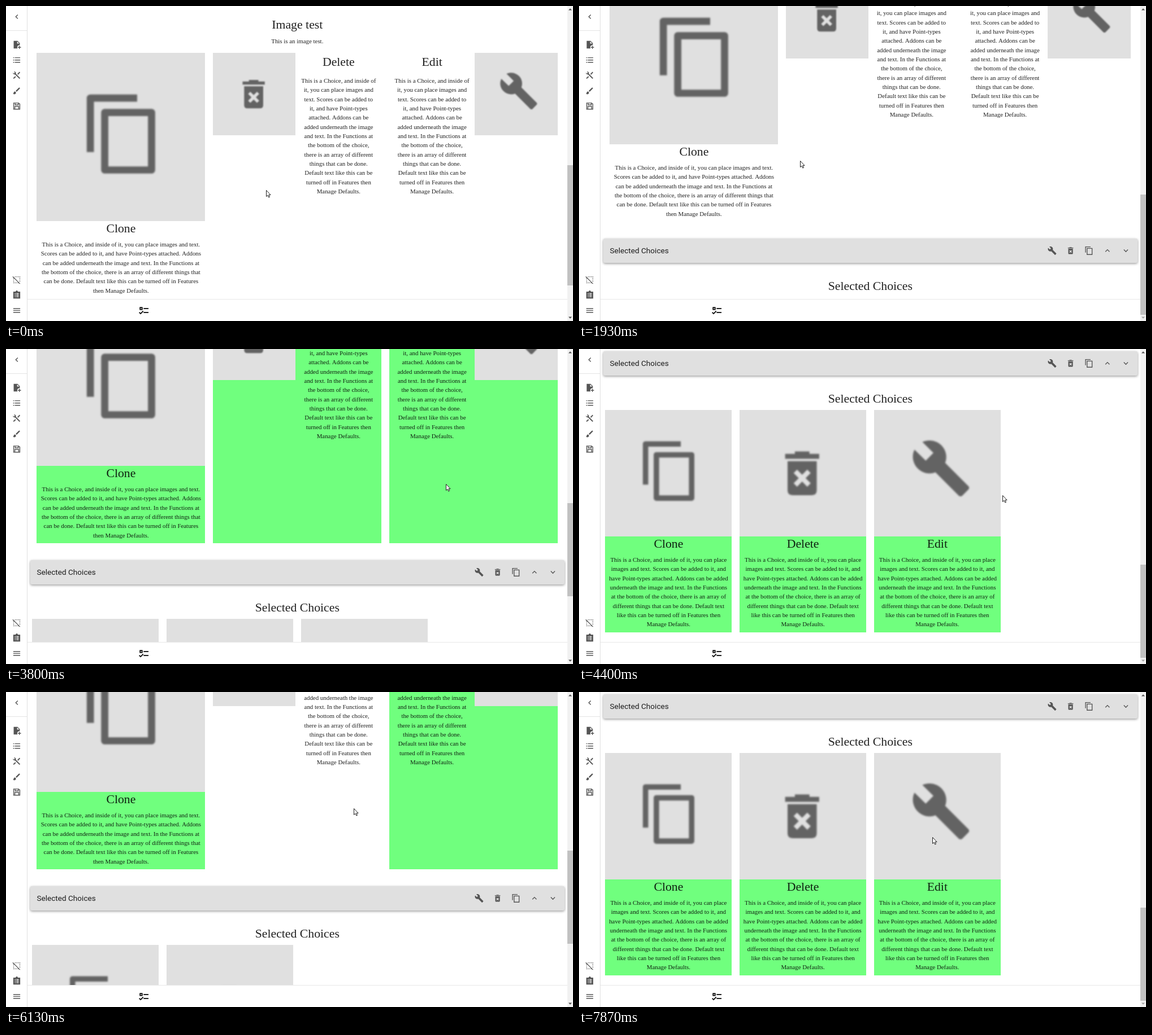
Write an HTML page with a canvas that moves like this. It is 1003x558 px and loops after 8670 ms.

```html
<!DOCTYPE html>
<html lang="en">
<head>
<meta charset="utf-8">
<title>Selected choices</title>
<style>
  html, body { margin: 0; width: 100%; height: 100%; overflow: hidden; background: #fff; }
  canvas { display: block; }
</style>
</head>
<body>
<canvas id="stage" width="1003" height="558"></canvas>
<script>
const ctx = document.getElementById('stage').getContext('2d');
const LOOP = 8670, NOTCH = 68, LOAD_TIME = 70;
const GREY = '#e0e0e0', GREEN = '#70ff7e', INK = 'rgba(0,0,0,.87)';
const SERIF = '"Liberation Serif", serif', BODY = 10.88, TITLE = 21.76, LEADING = 16.34;
const CENTER = 515.3;

const COPY = 'This is a Choice, and inside of it, you can place images and text. Scores can be added to it, ' +
  'and have Point-types attached. Addons can be added underneath the image and text. In the Functions at ' +
  'the bottom of the choice, there is an array of different things that can be done. Default text like ' +
  'this can be turned off in Features then Manage Defaults.';

// Icons on a 24-unit grid: a filled part, a stroked part and its line width
const rows = (ys, draw) => ys.map(draw).join('');
const shape = (fill, stroke, width = 2) => ({ fill: new Path2D(fill), stroke: new Path2D(stroke), width });
const icons = {
  back: shape('', 'M14.7 6.7 9.4 12l5.3 5.3'),
  up: shape('', 'M6.7 14.7 12 9.4l5.3 5.3'),
  down: shape('', 'M6.7 9.3l5.3 5.3 5.3-5.3'),
  menu: shape('', rows([7, 12, 17], y => `M3 ${y}h18`)),
  list: shape('', rows([6, 12, 18], y => `M2.7 ${y}h2.6M7 ${y}h14`)),
  add: shape('M4 2h10l6 6v5a6 6 0 0 0-6 9H4zM13 3.5V9h5.5z', 'M15 19h8M19 15v8'),
  tools: shape('M4.7 2.2a4 4 0 0 1 5 5 4 4 0 0 1-7.5-2.5l2.6 2.6 2.5-2.5z', 'M7 7 20 20M3.5 20 9 15M14.5 9.5 20 3.5', 2.8),
  brush: shape('M2 19c2 0 2-1 2-2a3 3 0 1 1 6 0c0 4-5 6-8 2z', 'M10.5 13.5l9-9', 3.5),
  save: shape('', 'M4 4h13l3 3v13H4zM8 4v5h8V4M7 20v-7h10v7'),
  selectOff: shape('', 'M1.6 3.6 20.4 22.4M19 4h2M3 20h2' +
    rows([7, 11, 15], p => `M${p} 4h2M${p} 20h2M3 ${p + 1}h2M19 ${p + 1}h2`), 1.8),
  clipboard: shape('M3 3h6a3 3 0 0 1 6 0h6v18H3z' + rows([7, 11, 15], y => `M7 ${y}h2v2h-2zM11 ${y}h6v2h-6z`), ''),
  checks: shape('', 'M4 6h4v4H4zM11 8h10M11 16h10M2.2 15.8 5 18.6l5.3-5.3'),
  Clone: shape('', 'M16 2H3v15M7 6h13v16H7z'),
  Delete: shape('M6 7h12v12q0 2-2 2H8q-2 0-2-2zM5 4h14v2H5zM9 3h6v1H9z' +
    'M8.5 11.9l1.4-1.4 2.1 2.1 2.1-2.1 1.4 1.4-2.1 2.1 2.1 2.1-1.4 1.4-2.1-2.1-2.1 2.1-1.4-1.4 2.1-2.1z', ''),
  Edit: shape('M22.7 19l-9.1-9.1c.9-2.3.4-5-1.5-6.9-2-2-5-2.4-7.4-1.3L9 6 6 9 1.6 4.7C.4 7.1.9 10.1 2.9 12.1' +
    'c1.9 1.9 4.6 2.4 6.9 1.5l9.1 9.1q.7.6 1.4 0l2.3-2.3q.7-.7.1-1.4z', '')
};

// Icon centre and scale inside a picture, as fractions of its width
const placement = { Clone: [.511, .483, .0214], Delete: [.494, .501, .0192], Edit: [.53, .461, .0202] };

// Wheel bursts: start, end, notches
const bursts = [[880, 1130, 1], [1220, 1450, 1], [3670, 4370, 6], [5420, 5930, -5],
  [6350, 6680, 5], [6700, 7016, -4], [7220, 7740, 4]];

// Pointer legs: start, end, destination
const legs = [[330, 470, 462, 325], [1270, 1730, 391, 274], [1930, 2270, 270, 266], [2500, 2930, 480, 236],
  [3100, 3480, 778, 239], [3800, 4380, 749, 259], [4560, 5000, 788, 298], [5500, 6100, 615, 206],
  [6400, 7000, 586, 200], [7270, 7870, 625, 257]];

function ease(t, start, end) {
  const u = Math.min(1, Math.max(0, (t - start) / (end - start)));
  return u * u * (3 - 2 * u);
}

const scrollAt = t =>
  Math.round(bursts.reduce((sum, [start, end, notches]) => sum + notches * NOTCH * ease(t, start, end), 0));

const pointerAt = t => legs.reduce(([x, y], [start, end, toX, toY]) => {
  const u = ease(t, start, end);
  return [x + (toX - x) * u, y + (toY - y) * u];
}, [460, 326]);

function selectionAt(t) {
  const names = [];
  if (t >= 2470) names.push('Clone');
  if (t >= 3070 && t < 6130 || t >= 7130) names.push('Delete');
  if (t >= 3470) names.push('Edit');
  return names;
}

function wrap(text, ems) {
  ctx.font = '100px ' + SERIF;
  const lines = [];
  for (const word of text.split(' ')) {
    const last = lines[lines.length - 1];
    const joined = last + ' ' + word;
    if (last && ctx.measureText(joined).width <= ems * 100) lines[lines.length - 1] = joined;
    else lines.push(word);
  }
  return lines;
}
const wide = wrap(COPY, 26.5), narrow = wrap(COPY, 12.18), medium = wrap(COPY, 19.6);

function rect(x, y, w, h, color) {
  const left = Math.round(x), top = Math.round(y);
  ctx.fillStyle = color;
  ctx.fillRect(left, top, Math.round(x + w) - left, Math.round(y + h) - top);
}

function label(text, x, y, size, font = SERIF, align = 'center') {
  ctx.font = size + 'px ' + font;
  ctx.textAlign = align;
  ctx.fillStyle = INK;
  ctx.fillText(text, x, Math.round(y));
}

function icon(name, cx, cy, scale = .68, color = '#555') {
  const { fill, stroke, width } = icons[name];
  ctx.save();
  ctx.translate(cx, cy);
  ctx.scale(scale, scale);
  ctx.translate(-12, -12);
  ctx.fillStyle = ctx.strokeStyle = color;
  ctx.lineWidth = width;
  ctx.fill(fill, 'evenodd');
  ctx.stroke(stroke);
  ctx.restore();
}

function picture(name, x, y, size) {
  rect(x, y, size, size, GREY);
  if (!name) return;
  const [cx, cy, scale] = placement[name];
  ctx.save();
  ctx.lineJoin = 'round';
  ctx.filter = `blur(${size * .006}px)`;
  icon(name, x + cx * size, y + cy * size, scale * size, '#636363');
  ctx.restore();
}

function caption(name, lines, x, titleY, bodyY) {
  label(name, x, titleY, TITLE);
  lines.forEach((line, i) => label(line, x, bodyY + i * LEADING, BODY));
}

function drawChoices(selected) {
  label('Image test', CENTER, 40, TITLE);
  label('This is an image test.', CENTER, 66, BODY);
  ['Clone', 'Delete', 'Edit'].forEach((name, i) => {
    if (selected.includes(name)) rect(54.4 + i * 311.8, 83, 298, 435, GREEN);
  });
  picture('Clone', 54.4, 83, 297.7);
  picture('Delete', 366, 83, 146);
  picture('Edit', 829.4, 83, 146.4);
  caption('Clone', wide, 203.4, 401, 426);
  caption('Delete', narrow, 588.3, 106, 136);
  caption('Edit', narrow, 753.6, 106, 136);
}

function drawHeading() {
  ctx.save();
  ctx.shadowColor = 'rgba(0,0,0,.4)';
  ctx.shadowBlur = 4;
  ctx.shadowOffsetY = 1.5;
  ctx.fillStyle = GREY;
  ctx.beginPath();
  ctx.roundRect(43, 548, 945, 43, 3);
  ctx.fill();
  ctx.restore();
  label('Selected Choices', 54.4, 574, 13.6, 'Roboto, sans-serif', 'left');
  ['Edit', 'Delete', 'Clone', 'up', 'down'].forEach((name, i) => icon(name, 837 + i * 32.6, 569.4));
}

function drawCards(selected, loaded) {
  label('Selected Choices', CENTER, 639, TITLE);
  selected.forEach((name, i) => {
    const x = 46.4 + i * 237.7;
    rect(x, 652, 224, 394, GREEN);
    picture(loaded[i], x, 652, 224);
    caption(name, medium, x + 112, 896, 921);
  });
}

function triangle(y, dir, color) {
  ctx.fillStyle = color;
  ctx.beginPath();
  ctx.moveTo(995, y - 1.5 * dir);
  ctx.lineTo(1001, y - 1.5 * dir);
  ctx.lineTo(998, y + 1.8 * dir);
  ctx.fill();
}

function drawChrome(scroll, hasCards) {
  rect(38, 520, 955, 38, '#fff');
  rect(38, 519, 955, 1, '#e8e8e8');
  icon('checks', 244.2, 539.3, .87, '#000');

  rect(0, 0, 38, 558, '#fff');
  rect(37, 0, 1, 558, '#e0e0e0');
  rect(0, 43, 37, 1, '#e4e4e4');
  icon('back', 19, 19);
  ['add', 'list', 'tools', 'brush', 'save'].forEach((name, i) => icon(name, 19, 68.5 + i * 27.2));
  ['selectOff', 'clipboard', 'menu'].forEach((name, i) => icon(name, 19, 485 + i * 27.2));

  const height = hasCards ? 1809 : 1401, track = 535, top = 707 + scroll;
  rect(993, 0, 10, 558, '#f1f1f1');
  rect(993, 12 + top / height * track, 10, 558 / height * track, '#c1c1c1');
  triangle(6, -1, '#505050');
  triangle(552, 1, top + 558 > height - 2 ? '#a3a3a3' : '#505050');
}

const arrow = new Path2D('M0 0V11L2.6 8.8 4.3 12.6 6 11.8 4.4 8.1H7.6Z');
function drawPointer([x, y]) {
  ctx.save();
  ctx.translate(Math.round(x) + .5, Math.round(y) + .5);
  ctx.fillStyle = '#fff';
  ctx.strokeStyle = '#222';
  ctx.fill(arrow);
  ctx.stroke(arrow);
  ctx.restore();
}

function draw(now) {
  const t = now % LOOP, scroll = scrollAt(t), selected = selectionAt(t);
  rect(0, 0, 1003, 558, '#fff');
  ctx.save();
  ctx.translate(0, -scroll);
  drawChoices(selected);
  drawHeading();
  drawCards(selected, selectionAt(t - LOAD_TIME));
  ctx.restore();
  drawChrome(scroll, selected.length > 0);
  drawPointer(pointerAt(t));
  requestAnimationFrame(draw);
}
requestAnimationFrame(draw);
</script>
</body>
</html>
```
